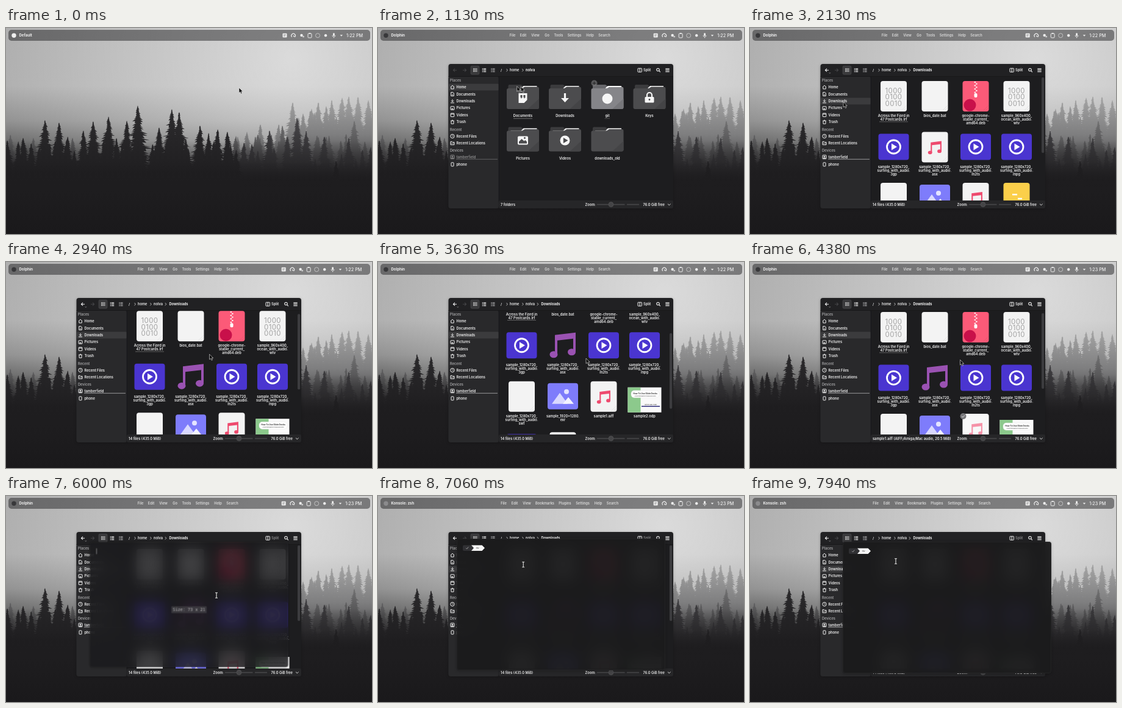
An HTML page with a canvas for the animation above (8 s loop, 600 by 338 pixels).

```html
<!DOCTYPE html>
<html lang="en">
<head>
<meta charset="utf-8">
<title>Desktop</title>
<style>
html, body { margin: 0; width: 100%; height: 100%; overflow: hidden; background: #1c1b1d; }
#wall, #desk, #top { position: absolute; left: 0; top: 0; width: 600px; height: 338px; }
text { font: 600 5.7px Inter, sans-serif; fill: #f0f0f0; white-space: pre; }
.mid { text-anchor: middle; }
.dim { fill: #a4a4a6; }
#term {
  position: absolute; left: 129px; top: 70px; width: 342px; height: 216px;
  border-radius: 4px; overflow: hidden; box-shadow: 0 1px 4px rgba(0,0,0,.25);
  backdrop-filter: blur(11px) saturate(1.5);
}
#term svg { display: block; }
#term text { font: 7.2px "Noto Sans Mono", monospace; fill: #c8c8c8; }
</style>
</head>
<body>
<canvas id="wall"></canvas>
<svg id="desk" viewBox="0 0 600 338"></svg>
<div id="term"></div>
<svg id="top" viewBox="0 0 600 338"></svg>
<script>
const $ = id => document.getElementById(id);
const LOOP = 8000;

// ---------- drawing helpers ----------
const txt = (x, y, s, a = '') => `<text x="${x}" y="${y + 2}" ${a}>${s}</text>`;
const mid = (x, y, s, a = '') => txt(x, y, s, 'class="mid" ' + a);
const rect = (x, y, w, h, f, r = 0, a = '') =>
  `<rect x="${x}" y="${y}" width="${w}" height="${h}" rx="${r}" fill="${f}" ${a}/>`;
const dot = (x, y, r, f, a = '') => `<circle cx="${x}" cy="${y}" r="${r}" fill="${f}" ${a}/>`;
const fill = (d, f, a = '') => `<path d="${d}" fill="${f}" ${a}/>`;
const line = (d, c = '#f0f0f0', w = 1, a = '') =>
  `<path d="${d}" fill="none" stroke="${c}" stroke-width="${w}" ${a}/>`;
const group = (id, s, a = '') => `<g id="${id}" ${a}>${s}</g>`;
const place = (x, y, s, k = 1) => `<g transform="translate(${x} ${y}) scale(${k})">${s}</g>`;

// ---------- wallpaper ----------
function paintWall() {
  const c = $('wall'), k = window.devicePixelRatio || 1, g = c.getContext('2d');
  c.width = 600 * k; c.height = 338 * k; g.scale(k, k);
  let seed = 11;
  const rnd = () => (seed = seed * 16807 % 2147483647) / 2147483647;
  const shade = (y0, y1, stops) => {
    const s = g.createLinearGradient(0, y0, 0, y1);
    stops.forEach(([p, col]) => s.addColorStop(p, col));
    return s;
  };
  g.fillStyle = shade(0, 338, [[0, '#aeaeae'], [.28, '#b0b0b0'], [.45, '#939393'],
    [.58, '#646464'], [.7, '#29282a'], [1, '#1b1a1c']]);
  g.fillRect(0, 0, 600, 338);
  const glow = g.createRadialGradient(470, 50, 0, 470, 50, 480);
  glow.addColorStop(0, 'rgba(255,255,255,.55)');
  glow.addColorStop(1, 'rgba(255,255,255,0)');
  g.fillStyle = glow;
  g.fillRect(0, 0, 600, 220);

  function tree(x, y) {
    const side = dir => {
      const pts = [];
      for (let h = 2; y + h < 300; h += 2.2 + rnd() * 2.2) {
        const w = Math.min(20, .8 + h * .25) * (.6 + rnd() * .8);
        pts.push([x + dir * w, y + h + 1.4], [x + dir * w * .5, y + h + 1]);
      }
      return pts;
    };
    g.beginPath();
    g.moveTo(x, y);
    side(1).concat(side(-1).reverse()).forEach(p => g.lineTo(...p));
    g.fill();
  }
  // named tops, then a row of random ones that closes the gaps below them
  function layer(style, tops, x0, x1, step, y0, y1) {
    g.fillStyle = style;
    tops.forEach(p => tree(...p));
    for (let x = x0; x < x1; x += step) tree(x + rnd() * step, y0 + rnd() * (y1 - y0));
  }
  layer(shade(110, 240, [[0, '#a6a6a6'], [.5, '#7e7e7f'], [1, '#3a393b']]),
    [[380,178],[395,170],[417,158],[447,158],[470,122],[487,140],[501,132],[512,122],[525,128],[534,118],
     [551,114],[562,112],[577,113],[594,118]], 465, 600, 9, 135, 160);
  layer(shade(145, 250, [[0, '#767677'], [1, '#2a292b']]),
    [[7,175],[45,180],[109,180],[377,177],[409,178],[453,160],[510,176],[571,152]], 400, 600, 14, 172, 195);
  g.fillStyle = shade(185, 262, [[0, 'rgba(30,29,31,0)'], [1, '#1e1d1f']]);
  g.fillRect(0, 185, 600, 153);
  layer(shade(150, 250, [[0, '#48474a'], [1, '#1e1d1f']]),
    [[390,188],[403,190],[432,168],[461,178],[477,147],[492,168],[522,178],[562,180],[598,195]],
    375, 600, 16, 195, 215);
  layer(shade(130, 240, [[0, '#2d2c2e'], [1, '#1f1e20']]),
    [[28,180],[64,151],[87,155],[101,178],[127,168],[143,153],[168,145],[198,152],[216,127],[251,163],
     [272,133],[284,138],[318,160],[332,172],[347,166],[363,170],[541,218]], 0, 375, 11, 180, 202);
  g.fillStyle = shade(220, 338, [[0, 'rgba(29,28,30,0)'], [.4, '#1e1d1f'], [1, '#1a191b']]);
  g.fillRect(0, 220, 600, 118);
}

// ---------- menu bar ----------
function barMarkup() {
  const tray = rect(453.5, 8.8, 7, 6.8, '#eee', 1) + line('M455 11h4M455 13h3', '#777', .8) +
    line('M468.6 14.8a3.3 3.3 0 1 1 5 0M471 12.5l2 2', '#eee', 1.1) +
    dot(484.5, 12, 2.2, '#eee') + dot(487.5, 14.2, 1.4, '#ccc') +
    rect(495, 9, 6, 7, 'none', 1.2, 'stroke="#eee" stroke-width="1"') + rect(496.7, 8, 2.6, 1.6, '#eee') +
    dot(511, 12.3, 3.5, 'none', 'stroke="#ddd" stroke-width=".7"') +
    dot(524, 12.3, 2.2, '#eee') +
    rect(536, 8.3, 2.8, 5, '#eee', 1.4) + line('M534.8 12a2.6 2.6 0 0 0 5.2 0M537.4 14.5v2', '#eee', .8) +
    fill('M547.6 11.3h4.4l-2.2 2.4z', '#eee');
  const menu = (id, names, xs) =>
    group(id, names.split(' ').map((n, i) => mid(xs[i], 12, n, 'style="fill:#dadada"')).join(''));
  return rect(4, 3, 593, 18, 'rgba(20,20,22,.46)', 5) +
    dot(13, 12.2, 3.7, '#eee', 'id="appDot"') +
    txt(21.5, 12.2, '', 'id="app" style="font-size:6px;font-weight:700"') +
    menu('menuA', 'File Edit View Go Tools Settings Help Search', [220.5, 238, 258, 277, 296, 322, 347.5, 371]) +
    menu('menuB', 'File Edit View Bookmarks Plugins Settings Help Search',
      [206, 224, 244, 273.5, 306.5, 335.5, 361, 384.5]) +
    group('tray', tray + txt(558, 12.6, '', 'id="clock" style="font-size:7.2px;font-weight:500"'));
}

// ---------- file manager ----------
function sidebarMarkup() {
  const home = line('M-3 0L0-2.8L3 0M-2.2-.4V3H2.2V-.4');
  const page = line('M-2.3-3H1L2.3-1.5V3H-2.3Z') + line('M-1 .3h2M-1 1.6h2', '#f0f0f0', .6);
  const down = line('M0-3V1M-2-.8L0 1.2L2-.8M-3 2.8H3');
  const pic = rect(-3, -2.6, 6, 5.4, 'none', .5, 'stroke="#f0f0f0"') + fill('M-2.2 2L-.5-.2L2.2 2z', '#f0f0f0');
  const film = rect(-2.8, -2.8, 5.6, 5.6, 'none', .5, 'stroke="#f0f0f0"') + line('M-2.8-1.6H2.8');
  const bin = line('M-2-1.4V3H2V-1.4M-3-1.9H3M-1-2.9H1');
  const clock = dot(0, 0, 3.2, 'none', 'stroke="#f0f0f0"') + line('M0-1.8V.2H1.5', '#f0f0f0', .8);
  const folder = line('M-3 2.6V-2.6H-.6L.4-1.6H3V2.6Z') + line('M-3 .2H3', '#f0f0f0', .7);
  const phone = rect(-2, -3, 4, 6, 'none', .6, 'stroke="#f0f0f0"');
  const disk = rect(-3, -3, 6, 6, 'none', .6, 'stroke="#f0f0f0"') + dot(0, -.5, 1.3, '#f0f0f0') + line('M-2 2h4');
  const rows = [[home, 97, 'Home'], [page, 108.5, 'Documents'], [down, 120, 'Downloads'], [pic, 131.4, 'Pictures'],
    [film, 142.8, 'Videos'], [bin, 154.2, 'Trash'], [clock, 177.5, 'Recent Files'],
    [folder, 189, 'Recent Locations'], [phone, 223.8, 'phone']];
  const row = ([icon, y, name]) => place(122, y, icon) + txt(128.5, y, name);
  return rect(116, 91.4, 81.5, 11.2, '#3b3b3d', 1, 'id="pick"') +
    txt(118, 86, 'Places', 'class="dim"') + txt(118, 166.5, 'Recent', 'class="dim"') +
    txt(118, 201, 'Devices', 'class="dim"') + rows.map(row).join('') +
    group('disk', row([disk, 211.7, 'tamberfield']) + line('M128 215.3H196', '#b5b5b7', .8));
}

function folderMarkup(x, y, name, mark, id = '') {
  return place(x, y, `<g ${id && `id="${id}"`}>` +
    fill('M-22-20H-3L1-17H22Q24-17 24-14V0H-24V-17Q-24-20-22-20Z', '#3b3b3d') +
    fill('M-3-14L1-18H23V-8H-20V-14Z', '#f4f4f4') +
    fill('M-23.5-14H-1L3-16.5H23.5Q26.5-16.5 26.5-13.5V17Q26.5 20 23.5 20H-23.5Q-26.5 20-26.5 17V-11Q-26.5-14-23.5-14Z', '#4c4c4e') +
    fill('M8 20L26.5 3V17Q26.5 20 23.5 20Z', '#444446') + '</g>' + mark) + mid(x, y + 31, name);
}

function homeMarkup() {
  const W = '#f6f6f6';
  const doc = fill('M-7-6H7V5L2 10H-7Z', W) + fill('M-4-3h3v4l-2 2v-2h-1zM1-3h3v4l-2 2v-2h-1z', '#4c4c4e');
  const arrow = fill('M-1.6-6H1.6V2H6.5L0 9L-6.5 2H-1.6Z', W);
  const lock = rect(-7.5, 0, 15, 9.5, W, 1.5) + line('M-4 1V-3a4 4 0 0 1 8 0V1', W, 2.2) + dot(0, 4.5, 1.4, '#4c4c4e');
  const pic = rect(-8.5, -5, 17, 14, W, 2) + fill('M-6.5 7V4L-2-.5L2 3L4 1.5L6.5 4V7Z', '#4c4c4e') + dot(3, -2, 1.4, '#4c4c4e');
  const play = dot(0, 2, 8, W) + fill('M-2.6-2.6L5 2L-2.6 6.6Z', '#4c4c4e');
  return folderMarkup(237.5, 113, 'Documents', doc) + folderMarkup(306.5, 113, 'Downloads', arrow) +
    folderMarkup(376, 113, 'git', dot(0, 3, 8.5, W), 'git') + folderMarkup(445, 113, 'Keys', lock) +
    folderMarkup(237.5, 182.5, 'Pictures', pic) + folderMarkup(306.5, 182.5, 'Videos', play) +
    folderMarkup(376, 182.5, 'downloads_old', '') +
    line('M222 148.6H253', '#bbb', .5, 'id="docLine"') +
    group('plus', dot(354.5, 90.5, 5, '#7c7c7e') + line('M351.7 90.5h5.6M354.5 87.7v5.6', '#333', 1.1)) +
    line('M371.5 148.6H380', '#bbb', .5, 'id="gitLine"');
}

function filesMarkup() {
  const cols = [235.5, 303, 370, 437], tops = [87, 170.5, 254, 337.5];
  const card = (f = '#f3f3f3') => rect(-21.5, 0, 43, 50, f, 4) + line('M12 49L21 40M16 49L21 44', 'rgba(0,0,0,.1)', .6);
  const note = (y, k, c) => place(0, y, fill('M-13-17L21-21V10H17V-11L-9-8V15H-13Z', c) +
    `<ellipse cx="-15" cy="15" rx="6.5" ry="5.5" fill="${c}"/><ellipse cx="14.5" cy="11" rx="6.5" ry="5.5" fill="${c}"/>`, k);
  const bits = card() + ['1000', '0100', '0010'].map((b, i) =>
    `<text class="mid" y="${20 + i * 10.3}" style="font:11.5px Inter,sans-serif;fill:#a3a3a3;letter-spacing:.4px">${b}</text>`).join('');
  const song = card() + note(26, .52, '#ee4a6e');
  const video = rect(-25, 3, 50, 43, '#4a35d0', 4) + dot(0, 24.5, 11, 'none', 'stroke="#fff" stroke-width="2.8"') +
    fill('M-3.5 19L5.5 24.5L-3.5 30Z', '#fff');
  let zip = '';
  for (let y = 1; y < 20; y += 2.8) zip += rect(y % 5.6 < 2.8 ? -2.4 : 0, y, 2.6, 1.7, '#fff');
  const deb = card('#fc5a78') + zip + rect(-2.5, 20, 5, 7, '#fff', 2) + dot(-9.5, 39.5, 10, '#c8104a');
  const image = rect(-25, 3, 50, 43, '#7e7cfb', 4) + dot(6, 17, 4, '#e4e4ff') +
    fill('M-18 37L-5 19L8 37Z', '#d9d8ff') + fill('M0 37L9 26L18 37Z', '#f3f3ff');
  const deck = card('#fbcf4a') + rect(-7, 18, 8, 2.5, '#fff') + line('M-8 33H9M2 26H9', '#fff', 2.4);
  const slide = rect(-27.5, 10, 55, 41, '#fafafa') + rect(-27.5, 10, 21, 41, '#8cc98c') +
    rect(-22, 15, 46, 12, '#fff', 5, 'stroke="#ddd" stroke-width=".4"') +
    mid(1, 19, 'How To Use Slide Decks', 'style="font-size:3.4px;fill:#222"') +
    mid(1, 22.8, 'A short introduction to talks and slides', 'style="font-size:1.9px;fill:#777"') +
    line('M-5 41H25', '#2b2a78', 1.4) + mid(10, 37, 'By the Class Team', 'style="font-size:2.2px;fill:#555"');
  const surf = e => ['sample_1280x720_', 'surfing_with_audio.', e];
  const list = [
    [bits, ['Across the Fjord in', '47 Postcards.lrf']], [card(), ['bios_date.bat']],
    [deb, ['google-chrome-', 'stable_current_', 'amd64.deb']], [bits, ['sample_960x400_', 'ocean_with_audio.', 'wtv']],
    [video, surf('3gp')], [group('asxA', song) + group('asxB', note(24.5, 1, '#9a52b2')), surf('asx')],
    [video, surf('m2ts')], [video, surf('mpg')],
    [card(), surf('swf')], [image, ['sample_1920×1280.', 'exr']], [song, ['sample1.aiff']],
    [group('odpA', deck) + group('odpB', slide), ['sample2.odp']],
    [video, surf('wmv')], [card(), ['sample3.txt']]
  ];
  return list.map(([icon, name], i) => place(cols[i % 4], tops[i >> 2],
    icon + name.map((s, n) => mid(0, 57 + n * 6.1, s)).join(''))).join('') +
    line('M212 153.8H259', '#aaa', .5) +
    group('check', rect(348.5, 254, 43, 50, 'rgba(255,255,255,.4)', 4) + dot(349.5, 258, 5, '#77777a') +
      line('M347.2 258l1.7 1.8l3-3.4', '#ddd', 1));
}

function windowMarkup() {
  const W = '#f0f0f0';
  const crumb = x => line(`M${x} 67l2 2.2l-2 2.2`, '#c8c8c8', .9);
  let grid = '';
  for (let i = 0; i < 9; i++) grid += rect(156 + i % 3 * 2.4, 66.2 + (i / 3 | 0) * 2.2, 1.6, 1.4, '#ddd');
  const rows = (x, c) => line(`M${x} 66.8h6.4M${x} 69.2h6.4M${x} 71.6h6.4`, c, 1.2, 'stroke-dasharray="1.6 .7 9"');
  const head = line('M129 69.2H123.5M126 66.7L123.4 69.2L126 71.7', W, 1.1, 'id="back"') +
    line('M129.8 73.4l1 1l1-1', W, .6, 'id="backMenu"') +
    line('M139 69.2H144.5M142 66.7L144.6 69.2L142 71.7', '#454547', 1.1) +
    rect(152, 62.2, 14, 14, '#39393b', 2, 'stroke="#505052" stroke-width=".6"') + grid +
    rows(170.8, W) + rows(185.2, '#a8a8aa') +
    txt(201, 69, '/') + crumb(210.5) + mid(223.7, 69, 'home') + crumb(236.3) +
    mid(249.6, 69, 'nolva', 'id="user"') +
    group('dirCrumb', crumb(260.8) + mid(283, 69, 'Downloads', 'style="font-weight:700"')) +
    group('split', rect(426, 66.2, 6.4, 6, 'none', .5, `stroke="${W}"`) + line('M429.2 66V72.4') +
      txt(435, 69, 'Split', 'id="splitText"')) +
    dot(459, 68.5, 2.2, 'none', `stroke="${W}" stroke-width="1.1"`) + line('M460.6 70.2l2.2 2.2', W, 1.2) +
    line('M471.3 66.8h6.4M471.3 69.2h6.4M471.3 71.6h6.4', W, 1.2);
  const foot = rect(198, 283, 286, 13, '#262628', 3) + txt(201, 289.8, '', 'id="status"') + txt(339.5, 289.8, 'Zoom:') +
    line('M359 289.6H404.5M408 289.6H428', '#454547', 1.8) +
    dot(382, 289.6, 4, '#454547', 'stroke="#5c5c5f" stroke-width=".5"') + txt(434.5, 289.8, '76.0 GiB free') +
    line('M475 288.6l2.3 2.2l2.3-2.2', W, .9);
  return rect(115.5, 59, 368.5, 237, '#212123', 4, 'style="filter:drop-shadow(0 1px 2px rgba(0,0,0,.25))"') +
    rect(115.5, 79.5, 82.5, 216.5, '#29292b', 4) + head +
    line('M115.5 79.5H484', '#161617', .8) + line('M198.2 80V296', '#161617', .8) + sidebarMarkup() +
    '<clipPath id="view"><path d="M198.6 80H484V283H198.6Z"/></clipPath><g clip-path="url(#view)">' +
    rect(198.6, 80, 286, 204, '#1d1d1f') + group('home', homeMarkup()) + group('files', filesMarkup()) +
    rect(478, 81, 4.2, 124, '#3c3c3f', 2, 'id="thumb"') + '</g>' + foot;
}

// ---------- terminal and pointer ----------
$('desk').innerHTML = barMarkup() + group('win', windowMarkup());
$('term').innerHTML = '<svg width="342" height="216">' +
  rect(.5, .5, 341, 215, 'none', 3.5, 'stroke="rgba(255,255,255,.04)"') +
  line('M11.5 11V21', '#a8a8a8', .9, 'id="caret"') +
  group('size', rect(140.5, 111, 61, 12, '#3a3a3d', 1) + mid(171, 117.4, 'Size: 73 x 21')) +
  group('prompt', rect(10, 10.7, 18, 9.2, '#303033', 2) + line('M15.2 15.4l1.4 1.5l2.6-3.2', '#b5b5b5', .8) +
    fill('M24 10.7H41.5L46 15.3L41.5 19.9H24L28 15.3Z', '#f4f4f4') + line('M32 15.6q1.2-1.2 2.2-.3t2.2-.3', '#333', .8)) + '</svg>';
const arrow = fill('M0 0V8.6L2 6.8L3.4 9.9L5 9.2L3.6 6.2H6.2Z', '#0a0a0a', 'stroke="#eee" stroke-width=".6"');
const beam = line('M-2-4.2H2M0-4.2V4.2M-2 4.2H2', '#111', 2.2) + line('M-2-4.2H2M0-4.2V4.2M-2 4.2H2', '#f0f0f0', 1.1);
$('top').innerHTML = group('cur', group('arrow', arrow + group('trail', place(-6.5, -.5, arrow))) + group('beam', beam));
paintWall();

// ---------- motion ----------
const POINTER = [[0, 382, 98], [940, 382, 98], [1130, 234.5, 96], [1400, 172, 113], [1690, 153, 121.5],
  [2250, 153, 121.5], [2800, 332, 150], [3630, 341, 158], [4380, 344.5, 160.5], [6000, 345, 163],
  [6440, 345, 163], [7190, 216, 102], [7250, 216, 102], [7940, 239, 107]];
const SCROLL = [[2850, 0], [3630, 58], [3900, 128], [4020, 128], [4380, 5], [4560, 0]];
const TERM_FADE = [[4750, 0], [5500, .38], [6000, .93], [6400, 1]];
const TERM_FILL = [[5000, .88], [6000, .9], [6800, .965]];

function at(table, t, col = 1) {
  const n = table.findIndex(r => r[0] > t);
  if (n < 0) return table[table.length - 1][col];
  if (!n) return table[0][col];
  const a = table[n - 1], b = table[n];
  return a[col] + (b[col] - a[col]) * (t - a[0]) / (b[0] - a[0]);
}
const ramp = (t, a, b) => Math.min(1, Math.max(0, (t - a) / (b - a)));
const set = (id, k, v) => $(id).setAttribute(k, v);
const show = (id, v) => set(id, 'opacity', +v);
const say = (id, s) => { if ($(id).textContent !== s) $(id).textContent = s; };

function draw(t) {
  const open = t >= 400, shell = t >= 6200, inDir = t >= 2000;
  say('app', shell ? 'Konsole: zsh' : open ? 'Dolphin' : 'Default');
  set('appDot', 'fill', shell ? '#8b8b8d' : open ? '#38383a' : '#eee');
  show('menuA', open && !shell);
  show('menuB', shell);
  set('tray', 'transform', `translate(${open ? -1.8 : 0} 0)`);
  say('clock', t < 4000 ? '1:22 PM' : '1:23 PM');

  const grow = 1 - (1 - ramp(t, 190, 880)) ** 2, k = .8 + .2 * grow;
  show('win', grow);
  set('win', 'transform', `translate(300 178) scale(${k}) translate(-300 -178)`);

  show('home', !inDir);
  show('files', inDir);
  show('thumb', inDir);
  show('dirCrumb', inDir);
  set('user', 'style', `font-weight:${inDir ? 600 : 700}`);
  set('back', 'stroke', inDir ? '#f0f0f0' : '#454547');
  show('backMenu', inDir);
  set('pick', 'y', inDir ? 114.4 : 91.4);
  show('disk', .5 + .5 * ramp(t, 1130, 1400));
  const left = 1 - ramp(t, 1000, 1350);
  set('git', 'style', `filter:brightness(${1 + 1.2 * left})`);
  show('plus', left);
  show('gitLine', left);
  show('docLine', t > 1100 && t < 1230);

  show('asxA', t < 2450);
  show('asxB', t >= 2450);
  show('odpA', t < 2650);
  show('odpB', t >= 2650);
  const y = at(SCROLL, t);
  set('files', 'transform', `translate(0 ${-y})`);
  set('thumb', 'y', 81 + y * .615);
  show('check', ramp(t, 3850, 3950) * (1 - ramp(t, 4400, 4800)));
  say('status', !inDir ? '7 folders' : t > 3850 && t < 4750
    ? 'sample1.aiff (AIFF/Amiga/Mac audio, 20.5 MiB)' : '14 files (435.0 MiB)');
  show('splitText', t < 5630 ? 1 : .5);

  const term = $('term').style, p = ramp(t, 4750, 6417), drag = ramp(t, 7250, 7940);
  term.visibility = p > 0 ? 'visible' : 'hidden';
  term.opacity = at(TERM_FADE, t);
  term.background = `rgba(27,27,29,${at(TERM_FILL, t)})`;
  term.transform = `translate(${23 * drag}px, ${5 * drag}px) scale(${.8 + .2 * p})`;
  show('caret', t < 6500);
  show('size', t > 5300 && t < 7000);
  show('prompt', t >= 6500);

  set('cur', 'transform', `translate(${at(POINTER, t)} ${at(POINTER, t, 2)})`);
  show('arrow', t < 5600);
  show('beam', t >= 5600);
  show('trail', t > 1100 && t < 1190);
}

const start = performance.now();
function tick() {
  draw((performance.now() - start) % LOOP);
  requestAnimationFrame(tick);
}
tick();
</script>
</body>
</html>
```
